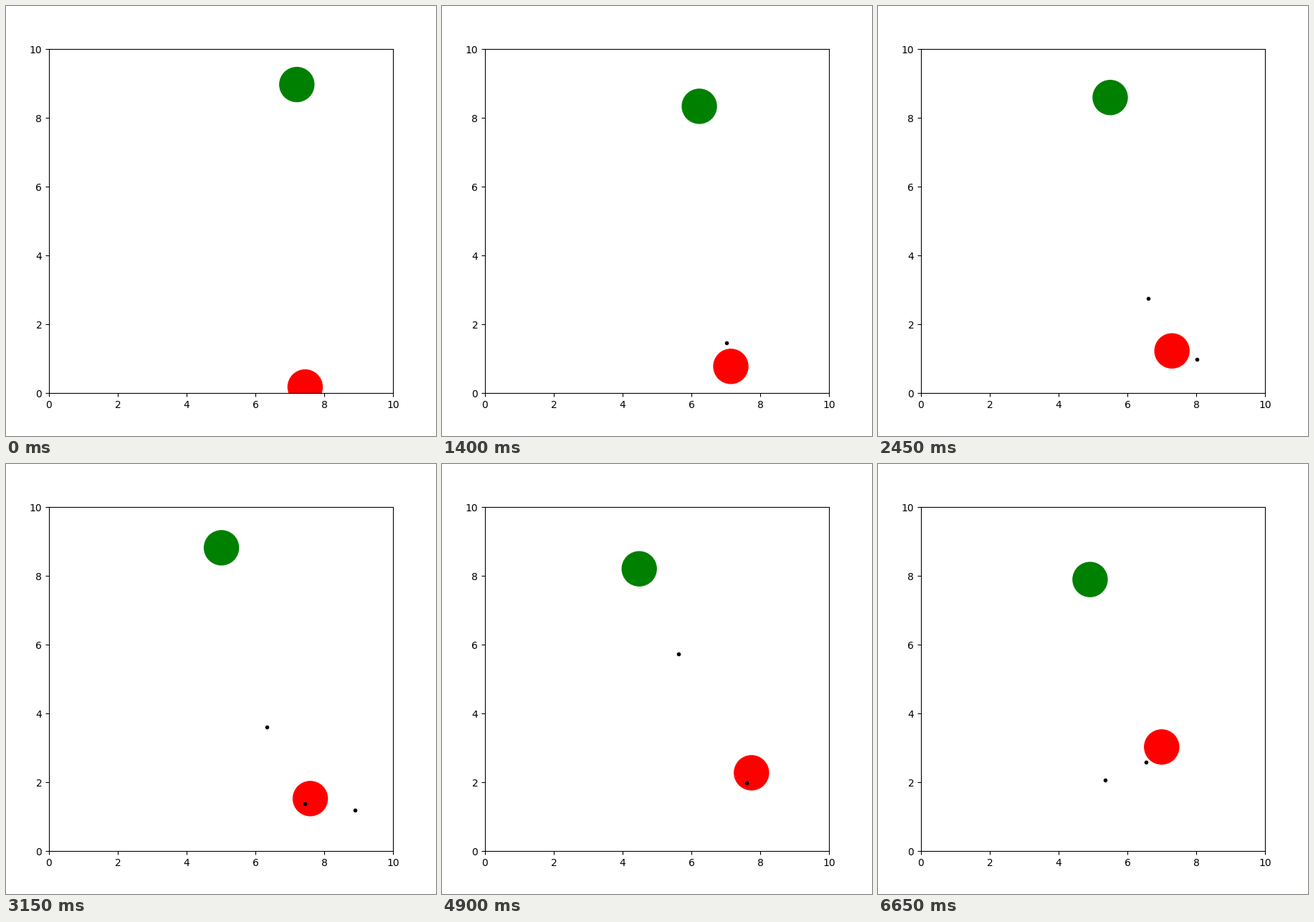
These frames come from a looping animation (600x600 px, 7 s). A matplotlib script:

```python
import matplotlib.pyplot as plt
import numpy as np
from matplotlib.animation import FuncAnimation

FRAMES = 20
INTERVAL = 350
SIZE = 10
RADIUS = 0.5
RED_STEP = 0.15
SHOT_STEP = 0.45
SHOT_EVERY = 4

steps = np.arange(FRAMES)


def slowing(keys):
    """Path through (step, value) keys; each leg's steps shrink as 1/sqrt(n)."""
    path = [keys[0][1]]
    for (k0, v0), (k1, v1) in zip(keys, keys[1:]):
        travel = np.cumsum(1 / np.sqrt(np.arange(1, k1 - k0 + 1)))
        path.extend(v0 + (v1 - v0) * travel / travel[-1])
    return np.array(path)


def steady(keys):
    """Straight legs through (step, value) keys."""
    return np.interp(steps, *zip(*keys))


# Green circle dodges: x drifts left then turns back, y zigzags
green_path = np.column_stack([
    steady([(0, 7.204), (9, 5.013), (11, 4.86), (15, 4.358),
            (16, 4.354), (17, 4.463), (19, 4.915)]),
    slowing([(0, 8.967), (5, 8.233), (9, 8.815), (12, 8.354),
             (13, 8.183), (16, 8.229), (17, 8.183), (19, 7.892)]),
])

# Red circle climbs on 45 degree legs
red_path = np.column_stack([
    7.446 + RED_STEP * steady([(0, 0), (1, 1), (5, -3), (12, 4), (19, -3)]),
    0.174 + RED_STEP * steps,
])

shot_angles = np.radians([108.03, 13.5, -82.7, 178.2, 180])


def live_shots(step):
    """Positions of shots that are on the field and have not hit green."""
    shots = []
    for i, angle in enumerate(shot_angles):
        fired = i * SHOT_EVERY
        age = step - fired - 1
        if age < 0:
            break
        heading = np.array([np.cos(angle), np.sin(angle)])
        pos = red_path[fired] + SHOT_STEP * age * heading
        inside = np.all((pos >= 0) & (pos <= SIZE))
        hit = np.hypot(*(pos - green_path[step])) < RADIUS
        if inside and not hit:
            shots.append(pos)
    return np.array(shots).reshape(-1, 2)


fig = plt.figure(figsize=(6, 6), dpi=100)
ax = fig.add_axes([0.1, 0.1, 0.8, 0.8])
ax.set_xlim(0, SIZE)
ax.set_ylim(0, SIZE)

red = ax.add_patch(plt.Circle(red_path[0], RADIUS, color="red"))
green = ax.add_patch(plt.Circle(green_path[0], RADIUS, color="green"))
dots, = ax.plot([], [], "k.", markersize=6)


def update(step):
    red.center = red_path[step]
    green.center = green_path[step]
    dots.set_data(*live_shots(step).T)
    return red, green, dots


anim = FuncAnimation(fig, update, frames=FRAMES, interval=INTERVAL,
                     repeat=True, repeat_delay=0)
plt.show()
```
